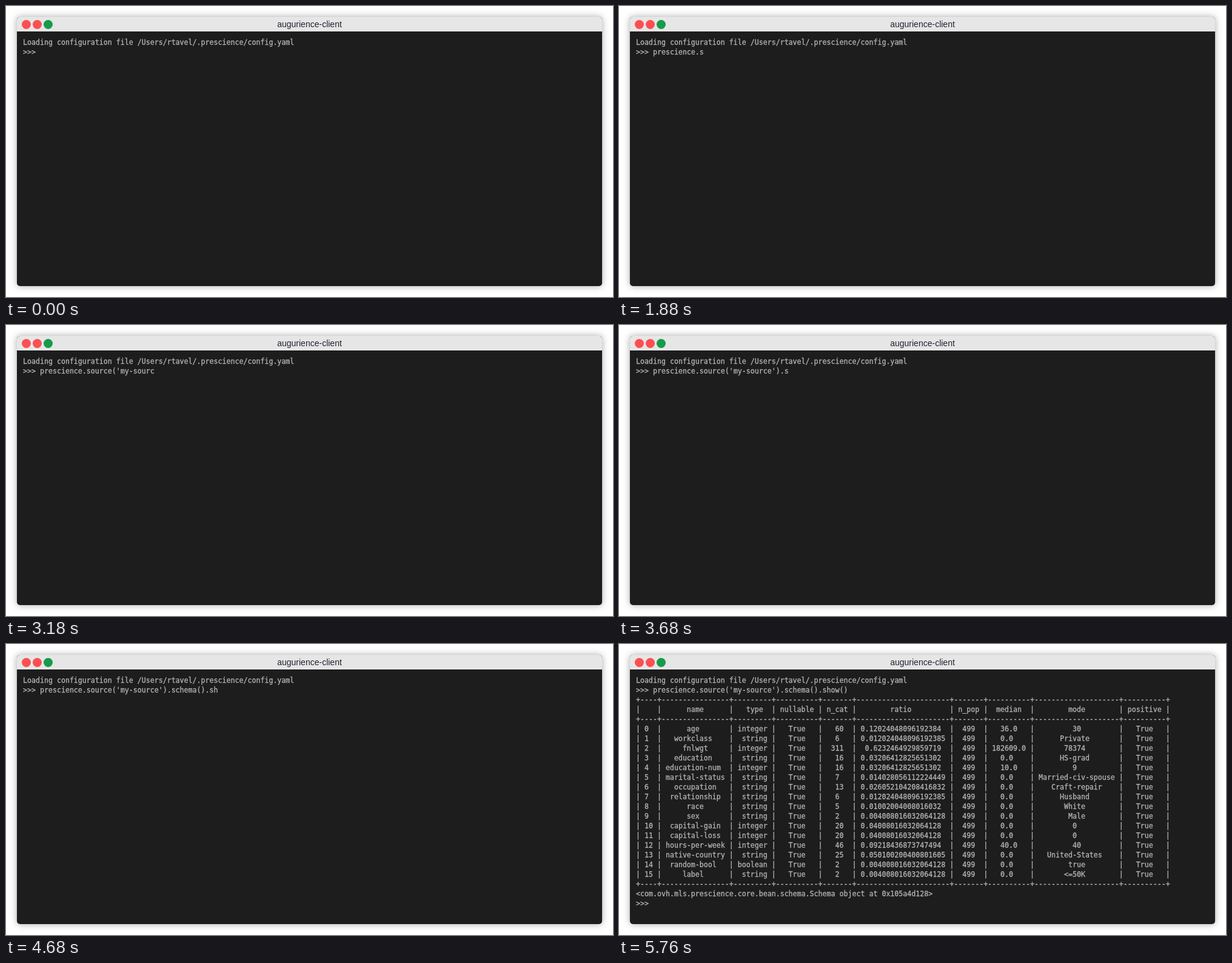
Recreate the animation shown at these times as an HTML page. Size 1001x480 px, loop 9130 ms.

```html
<!DOCTYPE html>
<html lang="en">
<head>
<meta charset="utf-8">
<title>Terminal</title>
<style>
  html, body { margin: 0; width: 100%; height: 100%; overflow: hidden; background: #fff; }
  .window {
    position: absolute; left: 18px; top: 18px; width: 965px; height: 444px;
    border-radius: 5px; overflow: hidden; background: #1d1d1d;
    box-shadow: 0 0 12px rgba(0, 0, 0, .35);
  }
  .bar {
    position: relative; height: 24px; background: #e6e6e6; color: #222230;
    font: 14px/24px "Liberation Sans", Arial, sans-serif; text-align: center;
  }
  .dot { position: absolute; top: 4.5px; width: 15px; height: 15px; border-radius: 50%; background: #fc4f52; }
  .dot:nth-child(1) { left: 7.5px; }
  .dot:nth-child(2) { left: 25.5px; }
  .dot:nth-child(3) { left: 43.5px; background: #169b4b; }
  pre {
    position: absolute; left: 10px; top: 34px; margin: 0; color: #b4b4b4;
    font: 11.627px/16px "DejaVu Sans Mono", monospace; font-variant-ligatures: none;
    -webkit-text-stroke: .3px;
  }
</style>
</head>
<body>
<div class="window">
  <div class="bar"><i class="dot"></i><i class="dot"></i><i class="dot"></i>augurience-client</div>
  <pre id="screen"></pre>
</div>
<script>
const LOOP = 9130, TYPE_START = 1380, STEP = 100, OUTPUT_AT = 5760;
const SAMPLES = 499;
const COMMAND = "prescience.source('my-source').schema().show()";
const INTRO = "Loading configuration file /Users/rtavel/.prescience/config.yaml\n>>> ";

// name, type, category count, median, mode
const FIELDS = [
  ["age", "integer", 60, "36.0", "30"],
  ["workclass", "string", 6, "0.0", "Private"],
  ["fnlwgt", "integer", 311, "182609.0", "78374"],
  ["education", "string", 16, "0.0", "HS-grad"],
  ["education-num", "integer", 16, "10.0", "9"],
  ["marital-status", "string", 7, "0.0", "Married-civ-spouse"],
  ["occupation", "string", 13, "0.0", "Craft-repair"],
  ["relationship", "string", 6, "0.0", "Husband"],
  ["race", "string", 5, "0.0", "White"],
  ["sex", "string", 2, "0.0", "Male"],
  ["capital-gain", "integer", 20, "0.0", "0"],
  ["capital-loss", "integer", 20, "0.0", "0"],
  ["hours-per-week", "integer", 46, "40.0", "40"],
  ["native-country", "string", 25, "0.0", "United-States"],
  ["random-bool", "boolean", 2, "0.0", "true"],
  ["label", "string", 2, "0.0", "<=50K"],
];

// An odd leftover space goes left of even-length text and right of odd-length text.
function center(text, width) {
  const spare = width - text.length;
  const left = text.length % 2 ? Math.floor(spare / 2) : Math.ceil(spare / 2);
  return " ".repeat(left) + text + " ".repeat(spare - left);
}

function buildTable() {
  const header = ["", "name", "type", "nullable", "n_cat", "ratio", "n_pop", "median", "mode", "positive"];
  const rows = FIELDS.map(([name, type, count, median, mode], i) =>
    [i, name, type, "True", count, count / SAMPLES, SAMPLES, median, mode, "True"].map(String));
  const widths = header.map((title, c) => Math.max(title.length, ...rows.map(row => row[c].length)));
  const rule = "+" + widths.map(w => "-".repeat(w + 2) + "+").join("");
  const line = row => "|" + row.map((cell, c) => ` ${center(cell, widths[c])} |`).join("");
  return [rule, line(header), rule, ...rows.map(line), rule].join("\n");
}

const OUTPUT = "\n" + buildTable() +
  "\n<com.ovh.mls.prescience.core.bean.schema.Schema object at 0x105a4d128>\n>>> ";

// Tab completion fills in "prescience" and "source"; the rest is typed key by key.
const COMPLETED = [1, 2, 3, 10, 11, 12, 13, 14, 17, 18];

function typedLength(time) {
  if (time < TYPE_START) return 0;
  const step = Math.floor((time - TYPE_START) / STEP);
  return COMPLETED[step] ?? Math.min(step + 9, COMMAND.length);
}

const screenElement = document.getElementById("screen");
const start = performance.now();
let shown = "";

function draw() {
  const time = (performance.now() - start) % LOOP;
  const text = INTRO + COMMAND.slice(0, typedLength(time)) + (time >= OUTPUT_AT ? OUTPUT : "");
  if (text !== shown) screenElement.textContent = shown = text;
  requestAnimationFrame(draw);
}
draw();
</script>
</body>
</html>
```
